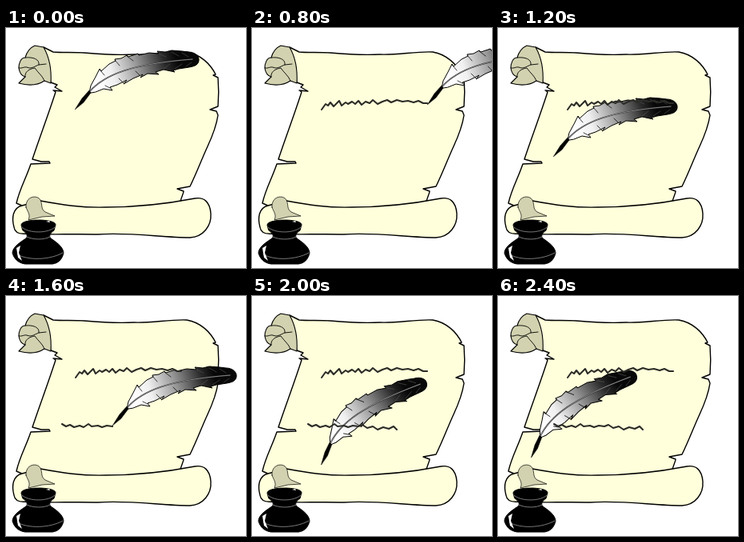
These frames come from a looping animation (300x300 px, 2600 ms). An HTML page with a canvas:

```html
<!DOCTYPE html>
<html lang="en">
<head>
<meta charset="utf-8">
<title>Quill and scroll</title>
<style>
html, body { margin: 0; width: 100%; height: 100%; overflow: hidden; background: #fff; }
canvas { display: block; width: 100vw; height: 100vh; }
</style>
</head>
<body>
<canvas id="stage" width="300" height="300"></canvas>
<script>
const ctx = document.getElementById('stage').getContext('2d');
const STEP = 200, LOOP = 2600;
const PAPER = '#ffffdb', SHADE = '#d2d2b0', INK = '#000';

// Nib position at each step
const nib = [
  [87, 101], [110, 94], [138, 96], [169, 90], [220, 95], [149, 128], [70, 160],
  [100, 161], [134, 161], [181, 167], [87, 210], [39, 253], [42, 201]
];
const TILT = -16 * Math.PI / 180;

const sheet = new Path2D(
  'M47 24 L59 30 C70 31 85 30 98 31 C120 33 140 34 160 33 C182 34 205 29 226 30 ' +
  'C244 33 256 46 262 58 L259 59 L265 62 C266 74 266 86 265 98 L255 102 L263 104 L265 109 ' +
  'C263 122 258 135 252 148 C245 163 238 182 230 198 L214 201 L222 204 ' +
  'C222 208 218 212 217 222 L45 230 L20 222 L13 219 C17 201 25 188 31 170 L55 169 L54 167 L44 167 L33 164 ' +
  'C42 137 53 108 62 80 L59 78 L70 79 L61 74 L64 71 L56 68 Z');
const roll = new Path2D(
  'M20 222 C8 225 7 238 10 249 C11 256 17 258 26 257 C55 259 80 257 115 258 ' +
  'C155 255 195 262 230 262 C247 261 257 247 256 232 C255 217 247 211 236 213 ' +
  'C205 219 165 224 125 224 C95 225 70 221 43 216 Z');
const lowerCurl = new Path2D(
  'M25 224 C24 210 39 208 43 215 C46 221 43 226 49 230 L61 235 L45 236 L28 240 C31 233 27 230 25 224 Z');
const upperCurl = new Path2D(
  'M47 24 L36 22 C29 25 26 30 24 37 C18 37 16 45 16 50 C17 57 20 60 24 61 ' +
  'L16 69 C27 72 39 72 48 66 L56 69 C57 54 55 38 47 24 Z');
const curlLines = new Path2D(
  'M24 37 C34 36 42 39 41 46 L50 45 M16 50 C20 51 23 48 26 49 C32 52 37 47 41 46 M24 61 C23 55 29 51 36 50 C40 56 46 60 48 66');

const vane = new Path2D(
  'M17 -20 L19 -29 L25 -40 L30 -50 L32 -47 L42 -56 L50 -60 L49 -62 L57 -63 L64 -67 L66 -65 ' +
  'L78 -69 L79 -67 L92 -70 L104 -69 L102 -72 L112 -71 L120 -73 L133 -72 L141 -71 ' +
  'C149 -71 155 -66 154 -60 C153 -54 147 -53 142 -52 L129 -50 L122 -48 L124 -46 L110 -49 L100 -46 L104 -43 L90 -44 ' +
  'L81 -39 L84 -43 L72 -38 L60 -31 L64 -36 L52 -30 L43 -27 L46 -23 L35 -25 L25 -21 Z');
const shaft = new Path2D('M-.5 .5 L8 -13 L17 -23 L19 -20 L10 -8 Z');
const spine = new Path2D('M17 -21 C36 -43 70 -56 146 -62');
const barbs = new Path2D('M30 -49 L36 -42 M49 -61 L55 -54 M43 -26 L37 -29 M60 -32 L54 -38 M81 -41 L75 -47 M64 -66 L72 -60');
const sheen = new Path2D('M104 -69 L113 -65 M120 -71 L129 -66 M133 -70 L141 -65 M110 -50 L118 -56 M124 -50 L133 -56 M138 -53 L145 -58');
const plume = ctx.createLinearGradient(28, -28, 132, -62);
[[0, '#fff'], [.2, '#f0f0f0'], [.5, '#969696'], [.8, '#2b2b2b'], [.95, '#080808']]
  .forEach(([at, color]) => plume.addColorStop(at, color));

const lineOne = new Path2D(
  'M87 102 L92 95 L95 97 L98 93 L102 98 L106 94 L109 91 L112 97 L117 93 L120 95 L125 92 ' +
  'L129 95 L133 91 L137 96 L142 92 L147 94 L151 90 L157 95 L163 92 L169 90 L174 93 L181 90 ' +
  'L188 92 L195 91 L202 93 L208 91 L214 94 L219 94');
const lineTwo = new Path2D(
  'M70 160 L75 163 L80 161 L85 164 L92 162 L97 164 L103 160 L107 163 L115 162 L120 164 ' +
  'L126 162 L133 163 L138 161 L144 165 L151 163 L157 167 L164 164 L171 166 L177 163 L181 167');

const bottle = new Path2D(
  'M19 246 C19 238 62 238 62 246 L60 253 C56 256 54 258 55 262 C61 267 71 272 72 281 ' +
  'C70 290 65 294 58 295 L24 295 C16 294 10 289 8 281 C9 272 20 267 26 262 C27 258 25 256 21 253 Z');
const glints = new Path2D('M20 249 C28 257 53 257 61 249 M26 261 C34 265 48 265 55 261 M14 283 C28 291 55 290 71 281');
const shine = new Path2D('M13 275 L18 272 L16 281 L20 291 L15 287 Z M50 242 L54 241 L55 243 Z');

function shape(path, fill, width = 1.4) {
  ctx.fillStyle = fill;
  ctx.fill(path);
  line(path, INK, width);
}

function line(path, color, width) {
  ctx.strokeStyle = color;
  ctx.lineWidth = width;
  ctx.stroke(path);
}

function drawScroll() {
  shape(sheet, PAPER);
  shape(upperCurl, SHADE, 1.1);
  line(curlLines, INK, .9);
  shape(roll, PAPER);
  shape(lowerCurl, SHADE, .7);
}

function drawBottle() {
  shape(bottle, INK, 1);
  line(glints, '#999', .8);
  ctx.fillStyle = '#fff';
  ctx.fill(shine);
}

function drawQuill(x, y, angle) {
  ctx.save();
  ctx.translate(x, y);
  ctx.rotate(angle);
  shape(vane, plume, 1);
  line(barbs, '#111', .8);
  line(sheen, '#555', .6);
  line(spine, '#222', 1.6);
  line(spine, '#ccc', .6);
  shape(shaft, INK, .6);
  ctx.restore();
}

function write(path, end) {
  ctx.save();
  ctx.beginPath();
  ctx.rect(0, 0, end, 300);
  ctx.clip();
  line(path, '#2c2c28', 2.1);
  ctx.restore();
}

function draw(step) {
  const [x, y] = nib[step];
  ctx.clearRect(0, 0, 300, 300);
  drawScroll();
  drawBottle();
  drawQuill(x, y, step > 9 ? TILT : 0);
  if (step > 0) write(lineOne, step < 5 ? x : 300);
  if (step > 6) write(lineTwo, step < 10 ? x : 300);
}

ctx.lineJoin = ctx.lineCap = 'round';
const start = performance.now();
let shown = -1;

function tick() {
  const step = Math.floor((performance.now() - start) % LOOP / STEP);
  if (step !== shown) draw(shown = step);
  requestAnimationFrame(tick);
}
tick();
</script>
</body>
</html>
```
